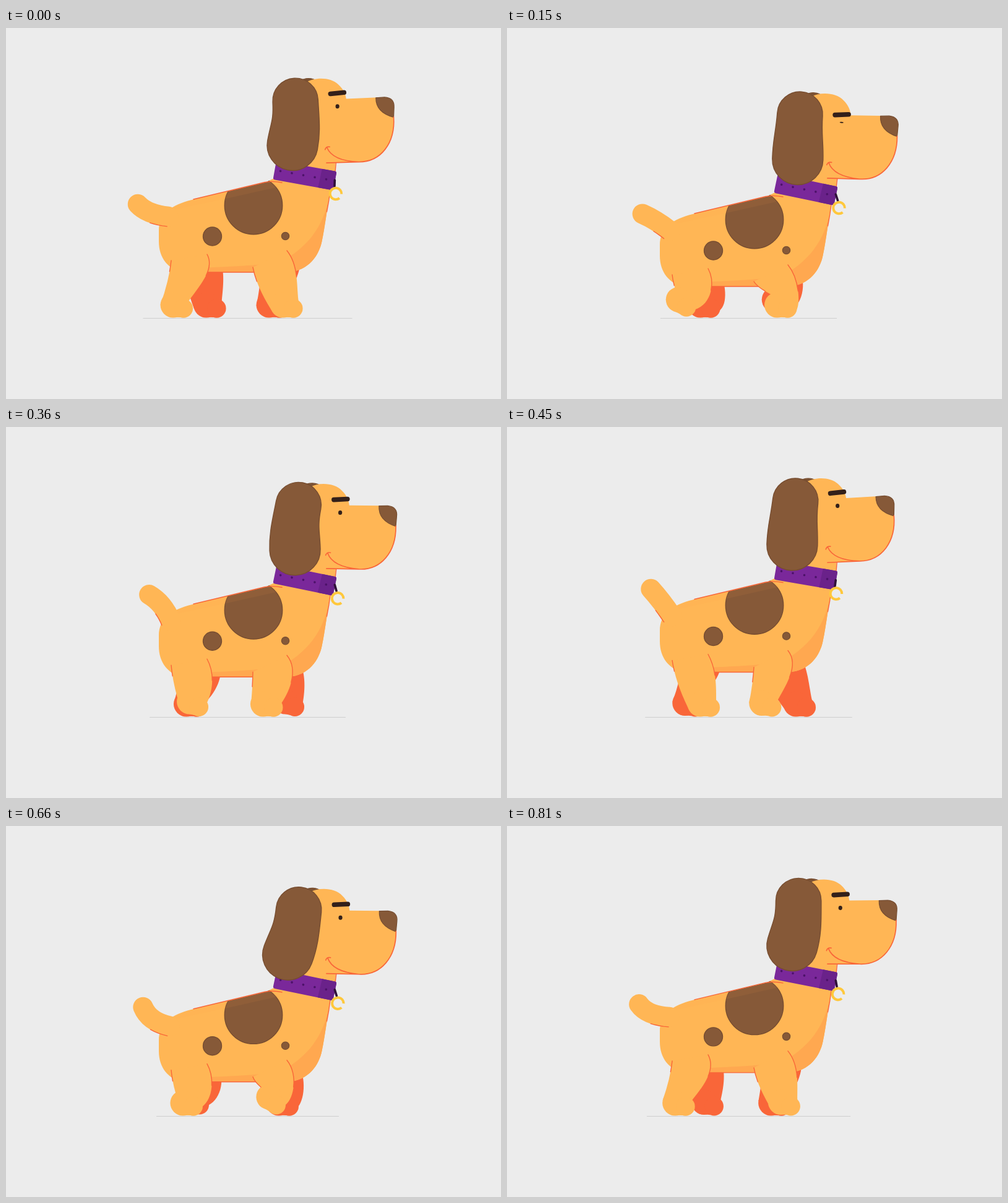
An HTML page with a canvas for the animation above (840 ms loop, 800 by 600 pixels).

```html
<!DOCTYPE html>
<html lang="en">
<head>
<meta charset="utf-8">
<title>Walking dog</title>
<style>
  html, body { margin: 0; width: 100%; height: 100%; overflow: hidden; background: #ececec; }
  canvas { display: block; width: 800px; height: 600px; }
</style>
</head>
<body>
<canvas id="stage" width="800" height="600"></canvas>
<script>
const ctx = document.getElementById('stage').getContext('2d');
const { sin, cos, PI, max, abs, floor, hypot, atan2 } = Math;
const TAU = PI * 2, DEG = PI / 180;
const STEPS = 22;
const FUR = '#ffb655', SHADE = '#ffa850', RED = '#f96639', BROWN = '#865938', EDGE = '#774d30', DARK = '#33201a';

const wrap = k => (k % STEPS + STEPS) % STEPS;
const wave = (k, lead = 0) => cos(k / STEPS * TAU + lead);

// How far the body sinks: two dips per cycle, as [step, pixels]
const DIPS = [[0, 0], [4, 23], [7, 21], [11, 0], [15, 15], [19, 18]];

// Smooth curve through periodic key points
function spline(keys, k) {
  const n = keys.length, t = wrap(k);
  const key = j => [keys[(j + n) % n][0] + STEPS * floor(j / n), keys[(j + n) % n][1]];
  let i = n - 1;
  while (keys[i][0] > t) i--;
  const [[t0, a], [t1, b], [t2, c], [t3, d]] = [-1, 0, 1, 2].map(j => key(i + j));
  const h = t2 - t1, s = (t - t1) / h, r = 1 - s;
  const m1 = (c - a) / (t2 - t0) * h, m2 = (d - b) / (t3 - t1) * h;
  return b * r * r * (1 + 2 * s) + c * s * s * (3 - 2 * s) + m1 * s * r * r - m2 * s * s * r;
}
const sink = k => spline(DIPS, k);

function fill(color, path) {
  ctx.fillStyle = color;
  ctx.fill(path);
}
function line(color, width, path) {
  ctx.strokeStyle = color;
  ctx.lineWidth = width;
  ctx.stroke(path);
}
function disc(color, x, y, rx, ry = rx) {
  const p = new Path2D();
  p.ellipse(x, y, rx, ry, 0, 0, TAU);
  fill(color, p);
  return p;
}
function group(x, y, angle, draw) {
  ctx.save();
  ctx.translate(x, y);
  ctx.rotate(angle * DEG);
  draw();
  ctx.restore();
}

const bodyPath = new Path2D('M433 243L420 249.500L300 278C268 286 247 300 247 328L247 345C247 372 262 390 285 395L455 395C490 393 506 367 510.500 345C516 320 519.500 285 526.500 252Z');
const bodyShade = new Path2D('M526 255C518 305 502 342 455 372C420 387 370 384 260 391V402H540V255Z');
const backBand = new Path2D('M262 296L360 275L440 257L430 244L300 276Z');
const bodyLines = new Path2D('M303 277L418 249.500Q432 247 446 250M524 263Q522 280 518.500 297M290 395H412');
const skull = new Path2D('M470 100L484 88C498 79 524 79 536 91C544 98 548 106 549 114L600 111.500L626 143C629 185 606 216 570 216L518 218L500 231L460 220Z');
const nose = new Path2D('M597 112L611 111C622 111.500 627 117 626.500 127L626 143.500C607 138.500 597 128 597 112Z');
const faceLines = new Path2D('M626 143C629 185 606 216 570 216L518 218M518.500 193C524 206 540 215 570 216M515.500 196.500Q517 191 523 192');

// All legs share one gait; each has its own hip, phase and sideways offset
const HIND = { front: [325, 366], back: [267, 376], foot: 270, knee: 12, dash: [36, 18] };
const FORE = { front: [454, 360], back: [399, 387], foot: 411, knee: 18, dash: [46, 24] };

function gait(p) {
  p = wrap(p);
  const reach = p < 12 ? (p / 12) ** 1.6 : ((STEPS - p) / 10) ** 1.4;
  const lift = p < 11 ? sin(p / 11 * PI) ** 1.5 : 0;
  return { reach: 42 * reach, lift };
}

function drawLeg({ front: [fx, fy], back: [bx, by], foot, knee, dash }, phase, drop, shift = 0) {
  const color = shift ? RED : FUR, R = 20.5, r = 15.2;
  const { reach, lift } = gait(phase);
  const pitch = (18 + 30 * lift) * DEG;
  const hx = foot + reach, hy = 448 - 10 * lift;
  const tx = hx + 17.7 * cos(pitch), ty = hy + 17.7 * sin(pitch);
  const ankle = (3 * drop - 55) * DEG;
  const ax = tx + 14.5 * cos(ankle), ay = ty + 14.5 * sin(ankle);
  const calf = (180 - (hx - bx - 4) / 2 + 3.3 * drop) * DEG;
  const ex = hx + R * cos(calf), ey = hy + R * sin(calf);
  const top = by + drop, hip = fy + drop;

  const front = new Path2D(), back = new Path2D(), sole = new Path2D();
  front.moveTo(fx, hip);
  front.bezierCurveTo(fx + knee, hip + 22, fx + 7 + .45 * (ax - fx) + .35 * drop, 410 + 1.6 * drop, ax, ay);
  back.moveTo(bx, top);
  back.quadraticCurveTo(bx + .2 * (ex - bx), top + .45 * (ey - top), ex, ey);

  const limb = new Path2D(front);
  limb.lineTo(tx, ty);
  limb.lineTo(hx, hy);
  limb.lineTo(ex, ey);
  limb.quadraticCurveTo(bx + .2 * (ex - bx), top + .45 * (ey - top), bx, top);
  sole.moveTo(hx, hy);
  sole.lineTo(hx - R * sin(pitch), hy + R * cos(pitch));
  sole.lineTo(tx - r * sin(pitch), ty + r * cos(pitch));
  sole.lineTo(tx, ty);

  ctx.save();
  ctx.translate(shift, 0);
  fill(color, limb);
  fill(color, sole);
  disc(color, hx, hy, R);
  disc(color, tx, ty, r);
  if (!shift) {
    [front, back].forEach((path, i) => {
      ctx.setLineDash([dash[i], 999]);
      line(RED, 1.4, path);
    });
  }
  ctx.restore();
}

function drawBody() {
  fill(FUR, bodyPath);
  ctx.save();
  ctx.clip(bodyPath);
  fill(SHADE, bodyShade);
  line(EDGE, 1.4, disc(BROWN, 400, 287, 46.7));
  fill('rgba(255,150,80,.07)', backBand);
  ctx.restore();
  line(EDGE, 1.4, disc(BROWN, 333.5, 337, 15));
  line(EDGE, 1.2, disc(BROWN, 451.5, 336.5, 6.2));
  line(RED, 1.4, bodyLines);
}

function drawTail(k) {
  const wag = wave(k), curl = wave(k, PI / 6);
  const x0 = 223 - 10 * wag, y0 = 272.5 + 12.5 * wag;
  const x1 = 240 - 14 * curl, y1 = 289 + 14 * curl;
  const x2 = 264.5 - 2.5 * wag, y2 = 305;
  const p = new Path2D(), under = new Path2D();
  p.moveTo(x0, y0);
  p.quadraticCurveTo(x1, y1, x2, y2);
  line(FUR, 32.5, p);
  for (let t = .6; t < 1.01; t += .1) {
    const u = 1 - t;
    const x = u * u * x0 + 2 * u * t * x1 + t * t * x2, y = u * u * y0 + 2 * u * t * y1 + t * t * y2;
    const vx = u * (x1 - x0) + t * (x2 - x1), vy = u * (y1 - y0) + t * (y2 - y1), v = hypot(vx, vy);
    under.lineTo(x - vy / v * 16, y + vx / v * 16);
  }
  line(RED, 1.4, under);
}

function drawNeck() {
  fill(FUR, new Path2D('M-30 -34L47 -34L50 -10L-30 -8Z'));
  line(RED, 1.4, new Path2D('M48.500 -29L50 -12'));
}

function drawCollar() {
  const band = new Path2D();
  band.roundRect(-47, -15.5, 99, 31, 3);
  fill('#7a289a', band);
  ctx.save();
  ctx.clip(band);
  fill('#6a228a', new Path2D('M28 -16H53V16H27Z'));
  ctx.restore();
  for (let i = -2; i < 3; i++) disc('#4c1269', i * 18.8, 0, 1.8);
}

function drawTag(drop, tilt) {
  const x = 532.5 + 1.1 * tilt, y = 268 + drop;
  const post = new Path2D(), ring = new Path2D();
  post.moveTo(531.3, 246 + drop);
  post.lineTo(x - 2, y - 12);
  line('#2f1038', 3.6, post);
  ring.arc(x, y, 9.3, 50 * DEG, 363 * DEG);
  ctx.lineCap = 'butt';
  line('#ffc83c', 4, ring);
  ctx.lineCap = 'round';
}

function drawHead(k) {
  const blink = max(0, 1 - abs(k - 4) / 3.5);
  ctx.translate(-488, -218);
  line(EDGE, 1.2, disc('#7c5233', 488, 97, 20, 15.5));
  fill(FUR, skull);
  fill(BROWN, nose);
  line(EDGE, 1.2, nose);
  line(RED, 1.7, faceLines);
  disc(DARK, 535, 126.5, 3.1, 3.5 - 2.5 * blink ** 2);
  group(534.5, 105 + 9 * blink, -6, () => line(DARK, 7.6, new Path2D('M-11 0H11')));
}

function drawEar(k, drop, tilt) {
  const tx = 467 + 100 * sin(tilt * DEG), ty = 118 + drop - .35 * tilt, r = 36.7;
  const bx = 463 + 7.5 * wave(k, -PI / 2), by = 189.5 + drop, R = 41;
  const axis = atan2(by - ty, bx - tx);
  const bend = .045 * (.5 + 3 * wave(k, PI / 4));
  const a = axis - bend, b = axis + bend, L = 30;
  // Point beside a disc centre, moved along the side's direction
  const side = (x, y, rad, dir, sign, along) =>
    [x + sign * rad * sin(dir) + along * cos(dir), y - sign * rad * cos(dir) + along * sin(dir)];
  const p = new Path2D();
  p.arc(tx, ty, r, a + PI / 2, a + PI * 1.5);
  p.bezierCurveTo(...side(tx, ty, r, a, 1, L), ...side(bx, by, R, b, 1, -L), ...side(bx, by, R, b, 1, 0));
  p.arc(bx, by, R, b - PI / 2, b + PI / 2);
  p.bezierCurveTo(...side(bx, by, R, b, -1, -L), ...side(tx, ty, r, a, -1, L), ...side(tx, ty, r, a, -1, 0));
  fill(BROWN, p);
  line(EDGE, 1.4, p);
}

function draw(ms) {
  // Five ticks of 30 ms carry four steps
  const tick = floor(ms % 840 / 30);
  const k = tick - floor((tick + 4) / 5);
  const drop = sink(k);
  const tilt = .235 * sink(k - 1) - .5; // the head follows one step late
  const half = 169 - 1.15 * drop;
  const atNeck = part => group(480.5, 238 + drop, 10 + tilt / 2, part);

  ctx.fillStyle = '#ececec';
  ctx.fillRect(0, 0, 800, 600);
  ctx.lineCap = ctx.lineJoin = 'round';
  ctx.fillStyle = '#cfcfcf';
  ctx.fillRect(390.5 - half, 469, half * 2, 1);

  drawLeg(FORE, k, drop, 14);
  drawLeg(HIND, k + 11, drop, 17);
  group(0, drop, 0, () => {
    drawBody();
    drawTail(k);
  });
  drawLeg(HIND, k, drop);
  drawLeg(FORE, k + 11, drop);
  atNeck(drawNeck);
  group(488, 218 + drop, tilt, () => drawHead(k));
  atNeck(drawCollar);
  drawTag(drop, tilt);
  drawEar(k, drop, tilt);
}

const start = performance.now();
function loop() {
  draw(performance.now() - start);
  requestAnimationFrame(loop);
}
loop();
</script>
</body>
</html>
```
